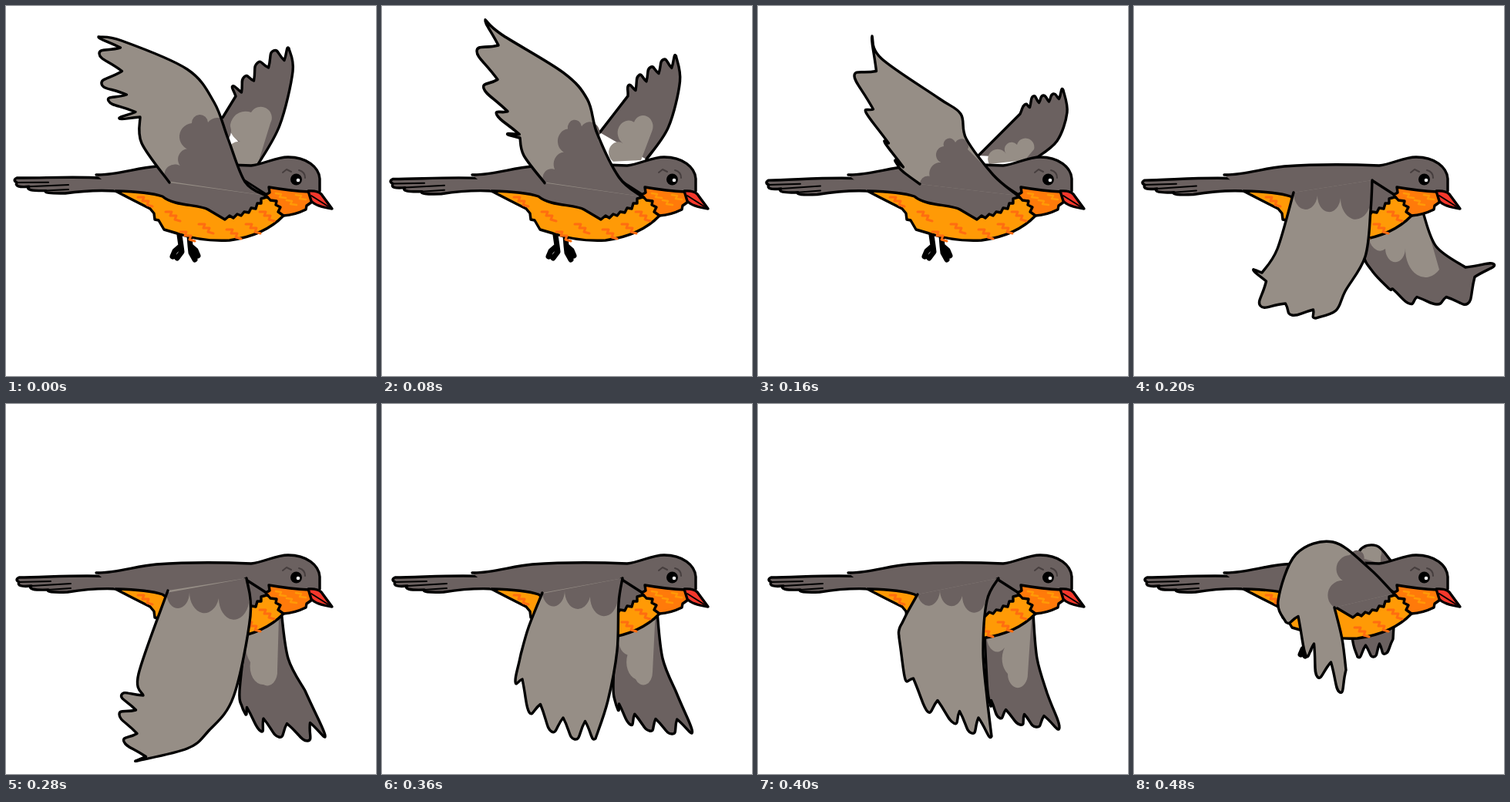
These frames come from a looping animation (480x480 px, 0.52 s). An HTML page:

```html
<!DOCTYPE html>
<html lang="en">
<head>
<meta charset="utf-8">
<title>Flying robin</title>
<style>
  html, body { margin: 0; width: 100%; height: 100%; overflow: hidden; background: #fff; }
  svg { display: block; width: 100%; height: 100%; }
  path { fill: none; stroke-linecap: round; stroke-linejoin: round; }
  .ink { stroke: #000; stroke-width: 3.4; }
  .thin { stroke-width: 2; }
  .leg { stroke-width: 7; }
  .dark { fill: #6b6160; }
  .light { fill: #968e86; }
  .orange { fill: #ff9a06; }
  .throat { fill: #ff7a0a; }
  .beak { fill: #f5382c; }
  .mark { stroke: #ff6d10; stroke-width: 3; }
  .fleck { stroke: #ff9a06; stroke-width: 2.5; }
  .brow { stroke: #463e3e; stroke-width: 2; }
</style>
</head>
<body>
<svg viewBox="0 0 480 480">
  <g class="wing">
    <path id="far" class="dark"/>
    <path id="farPatch" class="light"/>
    <path id="farLine" class="ink"/>
  </g>

  <g id="tail">
    <path class="ink dark" d="M138 224C100 221 50 225 17 225Q11 228 17 231Q13 238 33 236Q26 242 55 241Q50 245 80 244C105 240 125 239 145 240"/>
    <path class="ink thin" d="M17 231L58 230M33 236L84 233M55 241L84 239"/>
  </g>

  <path class="ink leg" d="M225 297l2 14l-8 7l-3 7m11-14l1 8l-6 8M238 298l1 13l7 6l3 7m-10-13l1 9l5 9"/>

  <path class="dark" d="M117 219C140 220 170 210 195 208Q250 204 318 207C335 205 350 196 366 196C390 196 406 209 407 224V243L360 272L285 278L203 248L142 240Z"/>
  <path class="ink orange" d="M142 240Q185 241 203 247C218 260 250 257 262 264L284 277l6-5l5 3l5-5l5 2l4-5l6 1l3-6l6 1l2-7h5v-6l7-2L362 258L360 272Q335 298 290 304Q255 306 222 295L205 290l-7-12l-5-1l-1-8l-5-6Q165 252 142 240Z"/>
  <path id="marks" class="mark"/>
  <path class="ink" d="M117 219C140 220 170 210 195 208Q250 204 318 207C335 205 350 196 366 196C390 196 406 209 407 224V240M310 227L338 245"/>

  <path class="ink throat" d="M341 235Q370 240 393 241l7 11l-10 7l-1 5Q375 271 360 272l-7-5l3-6l-6-3l1-5l-8-1l-6-7l5-3Z"/>
  <path id="flecks" class="fleck"/>
  <path class="ink beak" d="M392 240Q404 239 409 244L423 263Q402 260 396 253Z"/>
  <path class="ink thin" d="M396 246L418 260"/>
  <path class="brow" d="M359 216l5-4l6 3M380 213q8 2 8 10"/>
  <circle cx="376.5" cy="225" r="7.5"/>
  <circle cx="379" cy="226" r="2.3" fill="#fff"/>

  <g class="wing">
    <path id="near" class="light"/>
    <path id="nearPatch" class="dark"/>
    <path id="nearLine" class="ink"/>
  </g>
</svg>
<script>
const LOOP = 520;

const pairs = flat => flat.flatMap((x, i) => i % 2 ? [] : [[x, flat[i + 1]]]);
const lerp = ([ax, ay], [bx, by], k) => [ax + (bx - ax) * k, ay + (by - ay) * k];
const distance = ([ax, ay], [bx, by]) => Math.hypot(bx - ax, by - ay);
const cubic = (...points) => "C" + points.join(" ");

// Smooth curve through all points, continuing from the first one.
function smooth(points) {
  const at = i => points[Math.max(0, Math.min(points.length - 1, i))];
  const handle = (i, side) => at(i).map((v, axis) => v + side * (at(i + 1)[axis] - at(i - 1)[axis]) / 6);
  return points.slice(1).map((end, i) => cubic(handle(i, 1), handle(i + 1, -1), end)).join("");
}

// Trailing edge, a row of rounded feather tips, then the leading edge.
// Notches sit between neighbouring tips, pulled inwards by the notch vector.
function wingPath({ trail, tips, notch, lead }) {
  trail = pairs(trail);
  tips = pairs(tips);
  lead = pairs(lead);
  let path = "M" + trail[0] + smooth(trail);
  let from = trail.at(-1);
  tips.forEach((tip, i) => {
    const last = i === tips.length - 1;
    const to = last ? lead[0] : lerp(tip, tips[i + 1], .5).map((v, axis) => v + notch[axis]);
    const span = distance(from, to) || 1;
    const reach = .3 * Math.min(span, 25) / span;
    const round = side => tip.map((v, axis) => v + side * reach * (to[axis] - from[axis]));
    path += cubic(lerp(from, tip, .6), round(-1), tip);
    if (!last) path += cubic(round(1), lerp(to, tip, .6), to);
    from = to;
  });
  return path + smooth([tips.at(-1), ...lead]);
}

// Lobes bulge upwards on a raised wing and downwards on a lowered one.
function lobes(cusps, raised) {
  return "M" + cusps[0] + cusps.slice(1).map((point, i) => {
    const radius = distance(cusps[i], point) / 2;
    return `A${radius} ${radius * (raised ? 1 : 1.4)} 0 0 ${raised ? 1 : 0} ${point}`;
  }).join("");
}

const up = {
  raised: 1, tail: [-3, .9],
  near: {
    trail: [212, 229, 176, 178, 174, 144],
    tips: [147, 146, 133, 123, 124, 101, 121, 62, 120, 40], notch: [28, 3],
    lead: [150, 45, 235, 82, 270, 125, 288, 172, 310, 228, 337, 246],
    patch: [208, 227, 230, 211, 244, 187, 241, 152, 262, 151, 288, 173]
  },
  far: {
    trail: [279, 148, 298, 117],
    tips: [294, 104, 309, 92, 326, 74, 347, 58, 367, 55], notch: [4, 14],
    lead: [372, 85, 355, 155, 326, 207],
    patch: [300, 205, 304, 176, 318, 138, 343, 152, 326, 207]
  }
};

const forward = {
  raised: 1, tail: [-3, -.5],
  near: {
    trail: [210, 231, 192, 218, 184, 211],
    tips: [178, 200, 165, 178, 140, 138, 125, 90, 148, 39], notch: [17, 20],
    lead: [160, 68, 235, 120, 263, 140, 270, 172, 305, 219, 337, 246],
    patch: [210, 231, 231, 231, 243, 204, 241, 182, 256, 177, 272, 186]
  },
  far: {
    trail: [286, 194, 340, 140],
    tips: [346, 128, 357, 117, 370, 116, 383, 114, 396, 109], notch: [1, 9],
    lead: [401, 138, 388, 175, 360, 198],
    patch: [300, 205, 322, 192, 336, 180, 358, 186, 346, 200]
  }
};

const down = {
  raised: 0, tail: [-3, -.5],
  near: {
    trail: [207, 242, 186, 315, 166, 346],
    tips: [155, 343, 164, 389, 205, 401, 236, 405], notch: [12, -9],
    lead: [262, 395, 274, 370, 300, 325, 307, 265, 309, 226],
    patch: [207, 242, 238, 246, 268, 249, 305, 262]
  },
  far: {
    trail: [375, 268, 392, 312, 430, 339],
    tips: [467, 335, 433, 386, 393, 387, 357, 386, 330, 366], notch: [-8, -9],
    lead: [310, 345, 298, 322, 310, 290],
    patch: [305, 296, 326, 315, 352, 314, 396, 342, 375, 268]
  }
};

const low = {
  raised: 0, tail: [0, 0],
  near: {
    trail: [210, 242, 172, 350, 178, 378],
    tips: [150, 377, 147, 403, 153, 438, 170, 463], notch: [20, 7],
    lead: [235, 447, 262, 425, 295, 380, 317, 275, 312, 226],
    patch: [208, 245, 238, 244, 276, 252, 315, 258]
  },
  far: {
    trail: [357, 268, 366, 330, 388, 372],
    tips: [414, 430, 391, 437, 354, 432, 330, 424, 311, 403], notch: [-8, -20],
    lead: [306, 392, 303, 372, 312, 290],
    patch: [318, 292, 317, 335, 334, 364, 352, 345, 354, 276]
  }
};

const folding = {
  raised: 0, tail: [0, 0],
  near: {
    trail: [207, 247, 194, 270, 188, 282],
    tips: [183, 293, 191, 357, 220, 399, 254, 414, 277, 427, 303, 431], notch: [-4, -22],
    lead: [297, 380, 292, 320, 297, 255, 312, 226],
    patch: [207, 247, 236, 241, 265, 249, 296, 250]
  },
  far: {
    trail: [357, 272, 362, 330, 375, 375],
    tips: [391, 420, 361, 419, 340, 416, 313, 407, 302, 392], notch: [-5, -15],
    lead: [299, 380, 297, 360, 294, 300],
    patch: [297, 302, 320, 316, 324, 350, 350, 350, 355, 275]
  }
};

const folded = {
  raised: 1, tail: [0, 0],
  near: {
    trail: [260, 264, 270, 305, 275, 345],
    tips: [267, 374, 238, 354, 223, 326, 197, 283], notch: [3, -29],
    lead: [187, 255, 210, 195, 258, 179, 305, 213, 337, 246],
    patch: [260, 264, 281, 232, 280, 196, 298, 203]
  },
  far: {
    trail: [337, 288, 336, 305],
    tips: [326, 324, 311, 328, 290, 328], notch: [0, -15],
    lead: [283, 300, 286, 230, 293, 190, 315, 184, 333, 203],
    patch: [296, 200, 300, 188, 320, 198, 320, 207]
  }
};

const foldingNear = {
  trail: [208, 245, 190, 290, 180, 325],
  tips: [173, 360, 191, 400, 220, 425, 250, 435, 277, 434], notch: [0, -23],
  lead: [293, 385, 305, 320, 307, 258, 312, 226],
  patch: [208, 246, 237, 242, 270, 250, 306, 252]
};

// Halfway value of two equally built structures.
function between(a, b) {
  if (typeof a === "number") return (a + b) / 2;
  if (Array.isArray(a)) return a.map((v, i) => between(v, b[i]));
  return Object.fromEntries(Object.keys(a).map(key => [key, between(a[key], b[key])]));
}

const timeline = [
  { at: 0, pose: up },
  { at: 80, pose: { ...between(up, forward), stretch: 1.11 } },
  { at: 160, pose: forward },
  { at: 200, pose: down },
  { at: 240, pose: between(down, low) },
  { at: 280, pose: low },
  { at: 360, pose: { ...low, near: foldingNear, far: between(low.far, folding.far) } },
  { at: 400, pose: folding },
  { at: 480, pose: folded }
];

const byId = id => document.getElementById(id);
const setPath = (id, d) => byId(id).setAttribute("d", d);
const zigzags = (spots, shape) => pairs(spots).map(spot => `M${spot}${shape}`).join("");

setPath("marks", zigzags(
  [171, 248, 207, 267, 226, 293, 250, 283, 286, 290, 311, 283, 329, 267],
  "l8 0l-2 5l8 0l-2 5l7 2"));
setPath("flecks", zigzags([350, 243, 364, 252, 376, 245], "l7 1l-2 4l8 1"));

function showPose({ near, far, raised, tail: [shift, angle], stretch = 1 }) {
  for (const [id, wing] of Object.entries({ near, far })) {
    const outline = wingPath(wing);
    setPath(id, outline);
    setPath(id + "Line", outline);
  }
  const edge = pairs(near.lead).slice(-2);
  setPath("nearPatch", lobes(pairs(near.patch), raised) + "L" + edge.join("L") + "Z");
  const spot = pairs(far.patch);
  setPath("farPatch", lobes(spot.slice(0, -1), raised) + "L" + spot.at(-1) + "Z");
  byId("tail").setAttribute("transform", `translate(${shift} 0) rotate(${angle} 143 235)`);
  for (const wing of document.querySelectorAll(".wing"))
    wing.setAttribute("transform", `translate(0 235) scale(1 ${stretch}) translate(0 -235)`);
}

let shown;
function tick() {
  const time = performance.now() % LOOP;
  const { pose } = timeline.findLast(step => step.at <= time);
  if (pose !== shown) showPose(shown = pose);
  requestAnimationFrame(tick);
}
tick();
</script>
</body>
</html>
```
